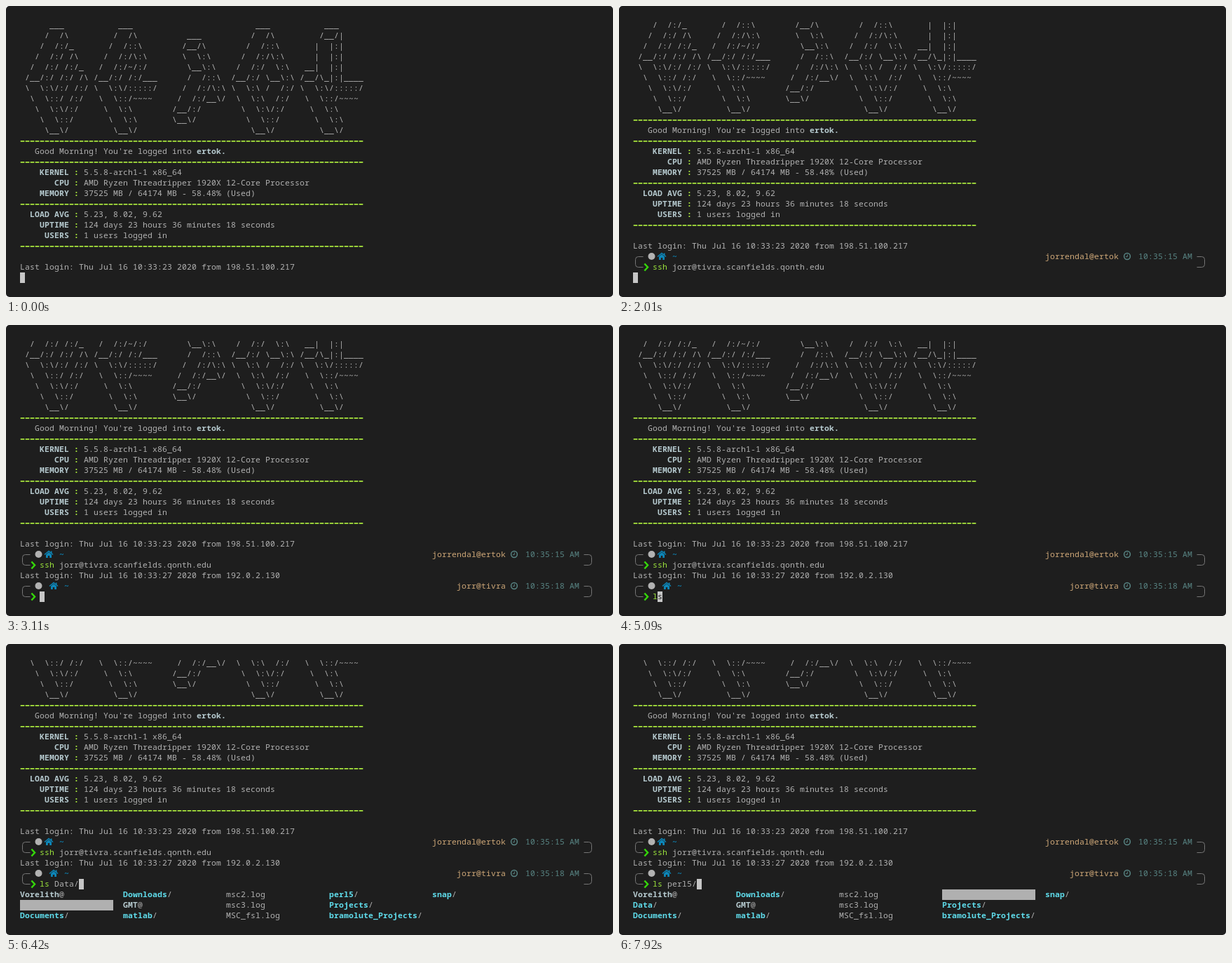
An HTML page with a canvas that plays this animation: 866x415 px, repeating every 8 s.

```html
<!DOCTYPE html>
<html lang="en">
<head>
<meta charset="utf-8">
<title>Terminal session</title>
<style>
html, body { margin: 0; width: 100%; height: 100%; overflow: hidden; background: #fff; }
canvas { display: block; width: 866px; height: 415px; }
</style>
</head>
<body>
<canvas id="stage" width="866" height="415"></canvas>
<script>
const ctx = document.getElementById('stage').getContext('2d');
const LOOP = 8000, CW = 7, LH = 15, PAD = 20;
const C = {
  bg: '#1e1e1e', text: '#b2b2b2', bold: '#b7cbd0', lime: '#b4f83f', cmd: '#9be33c',
  arrow: '#35d60a', frame: '#767676', blue: '#0d86b8', user: '#cfa878',
  clock: '#588483', dir: '#5fdceb', hint: '#6a6a6a', cursor: '#c6c6c6', pick: '#b0b0b0'
};
const FACE = '11.4px "Noto Sans Mono", "DejaVu Sans Mono", monospace';

const glyphs = [String.raw`
      ___
     /  /\
    /  /:/_
   /  /:/ /\
  /  /:/ /:/_
 /__/:/ /:/ /\
 \  \:\/:/ /:/
  \  \::/ /:/
   \  \:\/:/
    \  \::/
     \__\/`, String.raw`
      ___
     /  /\
    /  /::\
   /  /:/\:\
  /  /:/~/:/
 /__/:/ /:/___
 \  \:\/:::::/
  \  \::/~~~~
   \  \:\
    \  \:\
     \__\/`, String.raw`

      ___
     /__/\
     \  \:\
      \__\:\
      /  /::\
     /  /:/\:\
    /  /:/__\/
   /__/:/
   \__\/
`, String.raw`
      ___
     /  /\
    /  /::\
   /  /:/\:\
  /  /:/  \:\
 /__/:/ \__\:\
 \  \:\ /  /:/
  \  \:\  /:/
   \  \:\/:/
    \  \::/
     \__\/`, String.raw`
      ___
     /__/|
    |  |:|
    |  |:|
  __|  |:|
 /__/\_|:|____
 \  \:\/:::::/
  \  \::/~~~~
   \  \:\
    \  \:\
     \__\/`].map(g => g.slice(1).split('\n'));

const files = ['Vorelith@', 'Data/', 'Documents/', 'Downloads/', 'GMT@', 'matlab/',
  'msc2.log', 'msc3.log', 'MSC_fsl.log', 'perl5/', 'Projects/', 'bramolute_Projects/', 'snap/'];
const SSH = 'ssh jorr@tivra.scanfields.qonth.edu';

// [start, scroll, last row shown, cursor row, cursor column, typed 1, typed 2, picked file]
const steps = [
  [0, 0, 23, 24, 0],
  [30, 2, 25, 25, 4, 0],
  [720, 2, 25, 25, 5, 1],
  [850, 2, 25, 25, 6, 2],
  [1520, 2, 25, 25, 4 + SSH.length, SSH.length],
  [2010, 2, 25, 26, 0, SSH.length],
  [2370, 3, 26, 27, 0, SSH.length],
  [3070, 4, 28, 28, 4, SSH.length, ''],
  [5090, 4, 28, 28, 5, SSH.length, 'l'],
  [5390, 4, 28, 28, 6, SSH.length, 'ls'],
  [5520, 4, 28, 28, 7, SSH.length, 'ls '],
  [5800, 7, 31, 28, 7, SSH.length, 'ls ']
];
[6180, 6420, 6600, 6770, 6950, 7140, 7310, 7500, 7700, 7920].forEach((t, i) => {
  const name = files[i].replace('@', '/');
  const line = 'ls ' + name + (name.endsWith('/') ? '' : ' ');
  steps.push([t, 7, 31, 28, 4 + line.length, SSH.length, line, i]);
});

const colX = col => PAD + col * CW;

function put(str, col, y, color = C.text, bold = false) {
  ctx.font = (bold ? 'bold ' : '') + FACE;
  ctx.fillStyle = color;
  [...str].forEach((ch, i) => {
    if (ch !== ' ') ctx.fillText(ch, colX(col + i) + CW / 2, y + 11);
  });
}

function block(col, y, cols, color) {
  ctx.fillStyle = color;
  ctx.fillRect(colX(col), y, cols * CW, LH);
}

function line(points, color, width) {
  ctx.strokeStyle = color;
  ctx.lineWidth = width;
  ctx.beginPath();
  points.forEach(([x, y]) => ctx.lineTo(x, y));
  ctx.stroke();
}

function poly(points, color) {
  ctx.fillStyle = color;
  ctx.beginPath();
  points.forEach(([x, y]) => ctx.lineTo(x, y));
  ctx.fill();
}

function rule(y) {
  ctx.fillStyle = C.lime;
  for (let i = 0; i < 70; i++) ctx.fillRect(colX(i) + 0.7, y + 7, 5.6, 1.6);
}

function info(label, value, y) {
  put(label, 10 - label.length, y, C.bold, true);
  put(':', 11, y, C.lime, true);
  put(value, 13, y);
}

// Half of the rounded bracket around a prompt; dir is 1 for left, -1 for right
function corner(x, y, dir, top) {
  const mid = y + 7.5, edge = top ? y + LH : y;
  ctx.strokeStyle = C.frame;
  ctx.lineWidth = 1;
  ctx.beginPath();
  ctx.moveTo(x + dir * 11, mid);
  ctx.arcTo(x, mid, x, edge, 4);
  ctx.lineTo(x, edge);
  ctx.stroke();
}

function corners(y, top) {
  corner(23.5, y, 1, top);
  corner(835.5, y, -1, top);
}

function house(x, y) {
  line([[x - 6, y + 0.5], [x, y - 4.5], [x + 6, y + 0.5]], C.blue, 1.5);
  poly([[x - 4, y + 0.5], [x, y - 3], [x + 4, y + 0.5], [x + 4, y + 5], [x + 1.2, y + 5],
    [x + 1.2, y + 2], [x - 1.2, y + 2], [x - 1.2, y + 5], [x - 4, y + 5]], C.blue);
  ctx.fillRect(x + 2.8, y - 4.5, 1.7, 3);
}

function promptTop(y, homeCol, user, time) {
  const mid = y + 7;
  corners(y, true);
  ctx.fillStyle = C.text;
  ctx.beginPath();
  ctx.arc(46.5, mid, 5, 0, 7);
  ctx.fill();
  house(colX(homeCol) + 6, mid);
  put('~', homeCol + 3, y, C.blue, true);
  put(user, 99 - user.length, y, C.user);
  ctx.strokeStyle = C.clock;
  ctx.lineWidth = 1.5;
  ctx.beginPath();
  ctx.arc(725, mid, 4.4, 0, 7);
  ctx.stroke();
  line([[725.3, mid - 2.6], [725.3, mid + 0.6], [723, mid + 0.6]], C.clock, 1);
  put(time, 103, y, C.clock);
}

function promptLine(y, typed, hint = '') {
  corners(y, false);
  line([[36.4, y + 2.5], [41, y + 7.5], [36.4, y + 12.5]], C.arrow, 2.5);
  const cut = typed.indexOf(' ') < 0 ? typed.length : typed.indexOf(' ');
  put(typed.slice(0, cut), 4, y, C.cmd);
  put(typed.slice(cut), 4 + cut, y);
  put(hint, 4 + typed.length, y, C.hint);
}

function listRow(row, y, picked) {
  for (let i = row; i < files.length; i += 3) {
    const col = (i - row) / 3 * 21, name = files[i];
    if (i === picked) {
      block(col, y, 19, C.pick);
      continue;
    }
    const mark = name.slice(-1);
    if (mark === '/' || mark === '@') {
      put(name.slice(0, -1), col, y, mark === '/' ? C.dir : C.bold, true);
      put(mark, col + name.length - 1, y);
    } else put(name, col, y);
  }
}

const rows = {
  11: rule, 13: rule, 17: rule, 21: rule,
  12: y => {
    put("Good Morning! You're logged into", 3, y);
    put('ertok.', 36, y, C.bold, true);
  },
  14: y => info('KERNEL', '5.5.8-arch1-1 x86_64', y),
  15: y => info('CPU', 'AMD Ryzen Threadripper 1920X 12-Core Processor', y),
  16: y => info('MEMORY', '37525 MB / 64174 MB - 58.48% (Used)', y),
  18: y => info('LOAD AVG', '5.23, 8.02, 9.62', y),
  19: y => info('UPTIME', '124 days 23 hours 36 minutes 18 seconds', y),
  20: y => info('USERS', '1 users logged in', y),
  23: y => put('Last login: Thu Jul 16 10:33:23 2020 from 198.51.100.217', 0, y),
  24: y => promptTop(y, 5, 'jorrendal@ertok', '10:35:15 AM'),
  25: (y, s) => promptLine(y, SSH.slice(0, s.ssh), s.ssh ? SSH.slice(s.ssh) : ''),
  26: y => put('Last login: Thu Jul 16 10:33:27 2020 from 192.0.2.130', 0, y),
  27: y => promptTop(y, 6, 'jorr@tivra', '10:35:18 AM'),
  28: (y, s) => promptLine(y, s.ls, s.ls === 'l' ? 's' : '')
};
for (let i = 0; i < 11; i++) rows[i] = y => glyphs.forEach((g, n) => put(g[i] || '', n * 14, y));
for (let i = 0; i < 3; i++) rows[29 + i] = (y, s) => listRow(i, y, s.picked);

function charUnderCursor(s) {
  if (s.curRow === 25 && s.ssh) return SSH[s.ssh] || '';
  return s.ls === 'l' ? 's' : '';
}

function draw(t) {
  const [, scroll, last, curRow, curCol, ssh, ls, picked] = steps.filter(s => s[0] <= t).pop();
  const s = { curRow, ssh, ls, picked };
  const rowY = r => PAD + (r - scroll) * LH;
  ctx.clearRect(0, 0, 866, 415);
  ctx.fillStyle = C.bg;
  ctx.beginPath();
  ctx.roundRect(0, 0, 866, 415, 5);
  ctx.fill();
  ctx.textAlign = 'center';
  for (let r = scroll; r <= last; r++) if (rows[r]) rows[r](rowY(r), s);
  block(curCol, rowY(curRow), 1, C.cursor);
  put(charUnderCursor(s), curCol, rowY(curRow), C.bg);
}

const start = performance.now();
function tick() {
  draw((performance.now() - start) % LOOP);
  requestAnimationFrame(tick);
}
tick();
</script>
</body>
</html>
```
